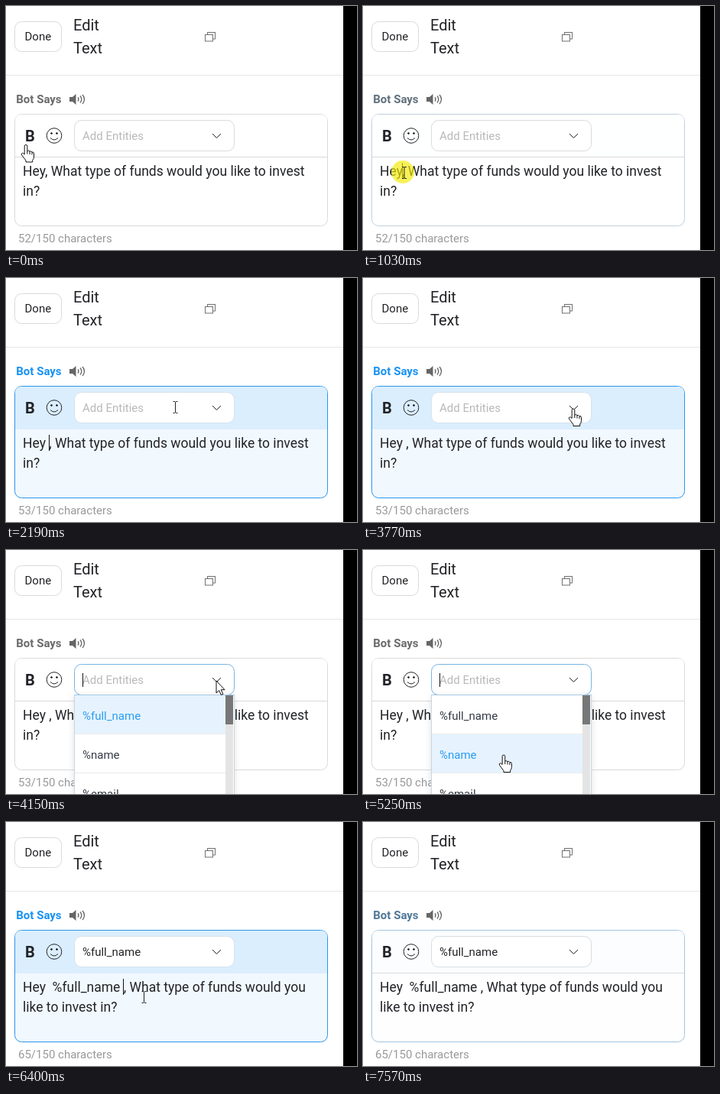
These frames come from a looping animation (459 px wide and 319 px high, 7650 ms). An HTML page:

```html
<!DOCTYPE html>
<html lang="en">
<head>
<meta charset="utf-8">
<title>Bot text editor</title>
<style>
  html, body { margin: 0; width: 100%; height: 100%; overflow: hidden; background: #fff; }
  svg { display: block; width: 459px; height: 319px; }
  text { font: 15px Roboto, Arial, sans-serif; fill: #222327; white-space: pre; }
  .title { font-size: 20px; }
  .body { font-size: 17.5px; }
  .bold { font-weight: 700; }
  .line { fill: none; stroke: #222327; }
  .edge { fill: #fff; stroke: #dadada; }
  .cursor { fill: #fff; stroke: #111; stroke-linejoin: round; }
</style>
</head>
<body>
<svg viewBox="0 0 459 319">
  <rect width="459" height="319" fill="#fff"/>
  <path d="M0 90.5H441" stroke="#e6e6e6"/>
  <rect class="edge" x="11.5" y="20.5" width="61" height="39" rx="9"/>
  <text x="24.5" y="45">Done</text>
  <text class="title" x="88" y="32">Edit</text>
  <text class="title" x="88" y="62">Text</text>
  <g fill="#fff" stroke="#707070">
    <rect x="263.5" y="34.5" width="10" height="8.5"/>
    <rect x="260.5" y="37.5" width="10" height="8.5"/>
  </g>

  <text id="label" class="bold" x="13.3" y="127">Bot Says</text>
  <path d="M83 119H87L91.5 115V129L87 125H83Z" fill="#666"/>
  <path d="M94 119.5Q96 122 94 124.5M97 117.5Q100.5 122 97 126.5M100 116Q105 122 100 128" fill="none" stroke="#666" stroke-width="1.3"/>

  <rect id="panel" x="11.5" y="141.5" width="409" height="146" rx="9"/>
  <path id="toolbar" d="M12 197V150.5Q12 142 20.5 142H411.5Q420 142 420 150.5V197Z"/>
  <path id="divider" d="M12 197.5H420"/>
  <text class="bold" x="25" y="177" style="font-size:20px">B</text>
  <g class="line">
    <circle cx="63" cy="169.5" r="9.8"/>
    <path d="M58 172.5Q63 177.5 68 172.5"/>
  </g>
  <circle cx="59.5" cy="166.5" r="1.2"/>
  <circle cx="66.5" cy="166.5" r="1.2"/>

  <text id="line1" class="body" x="22" y="221.6"></text>
  <text id="line2" class="body" x="22" y="247.6"></text>
  <path id="caret" d="M0 205V226" stroke="#111"/>
  <text id="count" x="16" y="309" style="fill:#999"></text>

  <rect id="select" class="edge" x="89.5" y="149.5" width="209" height="40" rx="9"/>
  <text id="value" x="100" y="175"></text>
  <path class="line" d="M270 167L275.5 172.5L281 167"/>
  <path id="selectCaret" d="M100.5 161V179" stroke="#111"/>

  <g id="menu">
    <rect x="89.5" y="189.5" width="209" height="150" fill="#fff" stroke="#c9d6e0" style="filter:drop-shadow(0 2px 4px rgba(0,0,0,.12))"/>
    <rect id="hover" x="90" width="197" height="50" fill="#e6f3fe"/>
    <path d="M90 240.5H287M90 291.5H287" stroke="#ebebeb"/>
    <text class="item" x="100" y="222">%full_name</text>
    <text class="item" x="100" y="273">%name</text>
    <text class="item" x="100" y="324">%email</text>
    <rect x="287" y="190" width="10" height="140" fill="#e4e4e4"/>
    <rect x="287" y="190" width="10" height="38" fill="#777"/>
    <path d="M89 189.5H299" stroke="#a9cbe6"/>
  </g>

  <circle id="click" r="15" fill="#f2ea00"/>
  <g id="pointer">
    <g id="hand" class="cursor">
      <path d="M-1.8 12.5V1.5Q-1.8 0 0 0T1.8 1.5V8Q4 6.8 5 8.6Q7 7.6 8 9.6Q10.5 9 10.5 11.5V15.5Q10.5 18.5 8.7 20V22.5H0V20.5L-5.3 13.5Q-6.5 11.3 -4.7 10.8Q-3.2 10.7 -1.8 12.5Z"/>
      <path d="M1.8 8V12M5 8.6V12.5M8 9.6V13" fill="none"/>
    </g>
    <path id="arrow" class="cursor" d="M0 0V16L3.7 12.6L6.3 18.5L8.8 17.4L6.2 11.7H11Z"/>
    <path id="beam" transform="translate(1 2)" d="M-3 -7.5H-1L0 -6.8L1 -7.5H3M0 -7V7M-3 7.5H-1L0 6.8L1 7.5H3" fill="none" stroke="#222"/>
  </g>
  <rect x="441" width="18" height="319"/>
</svg>
<script>
const LOOP = 7650, BLINK = 530, ROW = 51, WRAP = /^.{1,49}(?= )/;
const FOCUS = 1010, TYPE = 2120, OPEN = 3830, PICK = 5930, INSERT = 6100, BLUR = 7470;
const GREY = [218, 218, 218], WHITE = [255, 255, 255];

const $ = id => document.getElementById(id);
const items = document.querySelectorAll('.item');
const clamp = v => Math.max(0, Math.min(1, v));
const ramp = (t, start, length) => clamp((t - start) / length);
const smooth = k => k * k * (3 - 2 * k);
const pulse = (t, on, off, length) => ramp(t, on, length) - ramp(t, off, length);
const blink = (t, since) => (t - since) % (2 * BLINK) < BLINK;
const mix = (a, b, k) => `rgb(${a.map((v, i) => Math.round(v + (b[i] - v) * k))})`;
const show = (node, on) => node.setAttribute('visibility', on ? 'visible' : 'hidden');

const home = { x: 26, y: 181.5 };
const moves = [
  { from: 235, to: 800, x: 53, y: 216 },
  { from: 1370, to: 1890, x: 220.5, y: 167, sag: 25 },
  { from: 2880, to: 2980, x: 236.5, y: 170 },
  { from: 3260, to: 3450, x: 275, y: 171 },
  { from: 4400, to: 4700, x: 184, y: 268.5 },
  { from: 5220, to: 5710, x: 179.5, y: 227 },
  { from: 6530, to: 6720, x: 371, y: 320 },
  { from: 6900, to: 6950, x: 372, y: 340 }
];

function pointerAt(t) {
  let { x, y } = home;
  for (const move of moves) {
    const k = smooth(ramp(t, move.from, move.to - move.from));
    x += (move.x - x) * k;
    y += (move.y - y) * k + (move.sag || 0) * Math.sin(Math.PI * k);
  }
  return { x, y };
}

function pointerKind({ x, y }, open) {
  if (open > 0.5) return y > 190 ? 'hand' : 'arrow';
  const overButton = y < 198 && (x < 80 || x > 255);
  return overButton ? 'hand' : 'beam';
}

function drawEditor(t, focus) {
  const tint = (id, prop, a, b, k) => { $(id).style[prop] = mix(a, b, k); };
  const wash = focus * focus;
  tint('label', 'fill', [106, 106, 106], [24, 146, 243], focus);
  tint('panel', 'stroke', GREY, [42, 150, 234], focus);
  tint('panel', 'fill', WHITE, [241, 248, 254], wash);
  tint('toolbar', 'fill', WHITE, [219, 238, 254], wash);
  tint('divider', 'stroke', GREY, [219, 238, 254], wash);

  const typed = 'Hey' + (t < TYPE ? '' : t < INSERT ? ' ' : '  %full_name ');
  const message = typed + ', What type of funds would you like to invest in?';
  const first = message.match(WRAP)[0];
  $('line1').textContent = first;
  $('line2').textContent = message.slice(first.length + 1);
  $('count').textContent = `${message.length}/150 characters`;

  const since = t < TYPE + 70 ? FOCUS : t < INSERT ? TYPE + 70 : INSERT;
  const x = Math.floor(22 + $('line1').getSubStringLength(0, typed.length)) + 0.5;
  $('caret').setAttribute('transform', `translate(${x})`);
  show($('caret'), focus > 0 && t < BLUR && Math.abs(t - OPEN) > 70 && blink(t, since));
}

function drawSelect(t, focus, open, pointer) {
  const chosen = t >= INSERT;
  $('value').textContent = chosen ? '%full_name' : 'Add Entities';
  $('value').style.fill = chosen ? '#222327' : '#b8b8b8';
  $('select').style.stroke = open > 0 ? mix(GREY, [120, 180, 226], clamp(open * 1.8))
                                      : mix(GREY, [212, 226, 238], focus);
  show($('selectCaret'), t > OPEN && t < PICK && blink(t, OPEN));

  $('menu').setAttribute('opacity', open);
  $('menu').setAttribute('transform', `translate(0 ${-6 * (1 - open)})`);
  const active = pointer.y > 190 + ROW ? 1 : 0;
  $('hover').setAttribute('y', 190 + ROW * active);
  items.forEach((item, i) => { item.style.fill = i === active ? '#2a9df0' : '#333a44'; });
}

function drawPointer(t, open, { x, y }) {
  const kind = pointerKind({ x, y }, open);
  for (const id of ['hand', 'arrow', 'beam']) show($(id), id === kind);
  $('pointer').setAttribute('transform', `translate(${x} ${y})`);

  // The pointer rests while a click fades, so the mark can share its place.
  const strength = [FOCUS, OPEN, PICK].map(at => t < at ? 0 : clamp((240 - t + at) / 140));
  $('click').setAttribute('opacity', 0.65 * Math.max(...strength));
  $('click').setAttribute('transform', `translate(${x - 1} ${y + 1})`);
}

function draw(t) {
  const focus = pulse(t, FOCUS, OPEN - 50, 150) + pulse(t, INSERT, BLUR, 150);
  const open = pulse(t, OPEN, PICK, 200);
  const pointer = pointerAt(t);
  drawEditor(t, focus);
  drawSelect(t, focus, open, pointer);
  drawPointer(t, open, pointer);
}

const began = performance.now();
function tick() {
  draw((performance.now() - began) % LOOP);
  requestAnimationFrame(tick);
}
tick();
</script>
</body>
</html>
```
